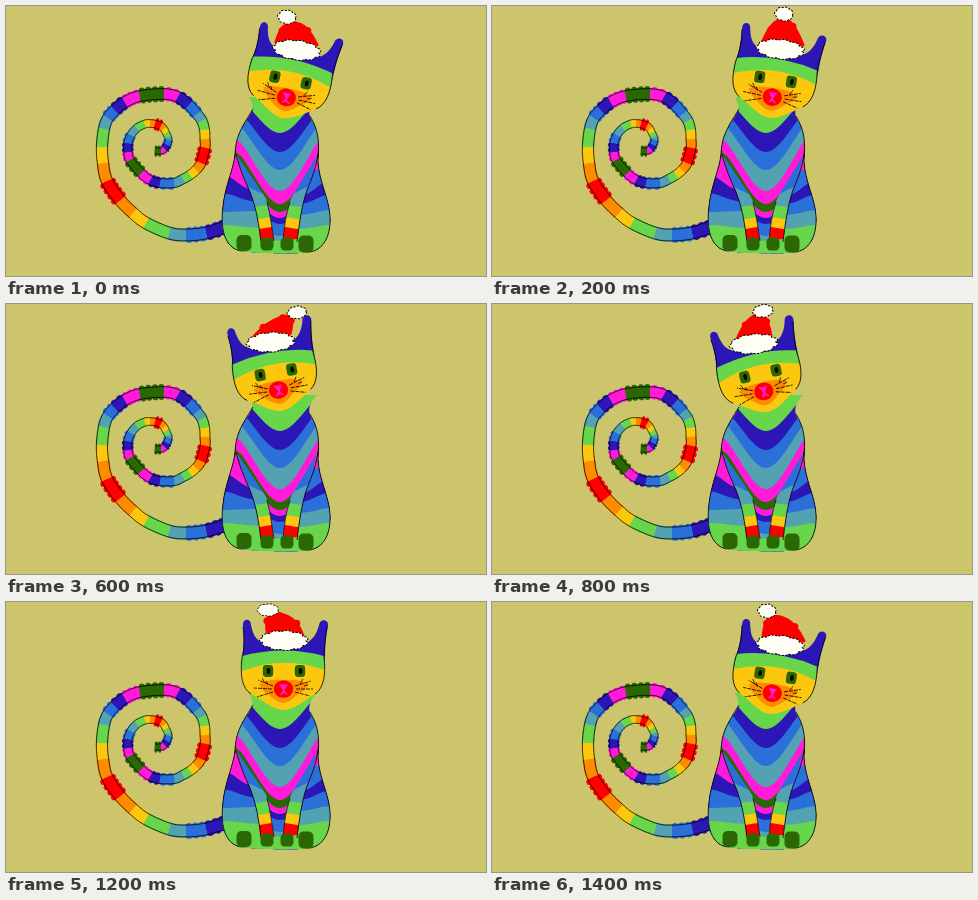
Animation, 480 px wide and 270 px high, one loop 1.6 s. Source, as an HTML page with a canvas:

```html
<!DOCTYPE html>
<html lang="en">
<head>
<meta charset="utf-8">
<title>Striped cat</title>
<style>
html, body { margin: 0; width: 100%; height: 100%; overflow: hidden; background: #cdc56b; }
canvas { display: block; width: 480px; height: 270px; }
</style>
</head>
<body>
<canvas id="stage" width="480" height="270"></canvas>
<script>
const ctx = document.getElementById('stage').getContext('2d');
const STEP = 200;
const INK = '#000';
const COL = {
  i: '#2c17b6', b: '#2b6fd9', t: '#53a2b2', g: '#68d64b', y: '#fcc80f',
  o: '#ff8c00', r: '#ff0000', m: '#ff1bd8', d: '#2b6804', w: '#fffef4'
};

// Head turn and shift, pompom (x, y, rx, ry), outline of the cap
const POSES = [
  { turn: 12, dx: -5.5, dy: 3.5, pom: [281, 11, 9, 6.8], cap: [270, 36, 274, 22, 286, 15, 303, 22, 311, 39] },
  { turn: 9, dx: -3.5, dy: 3.5, pom: [292, 8, 9, 6.8], cap: [270, 37, 277, 21, 289, 12, 302, 17, 311, 39] },
  { turn: 0, dx: 0, dy: 0, pom: [298, 8, 9, 6.2], cap: [259, 32, 273, 20, 291, 11, 299, 18, 297, 32] },
  { turn: -10, dx: 2, dy: -1.5, pom: [291, 8.5, 9.5, 6.2], cap: [246, 35, 256, 22, 279, 11, 288, 14, 284, 30] },
  { turn: -12.5, dx: 3, dy: -0.5, pom: [271, 7, 10, 6.2], cap: [245, 35, 252, 19, 266, 9, 276, 15, 279, 32] },
  { turn: -10, dx: 2, dy: -1.5, pom: [252, 6, 11, 5.8], cap: [247, 34, 249, 13, 262, 11, 274, 17, 277, 32] },
  { turn: 0, dx: 0, dy: 0, pom: [262, 8, 10.5, 6], cap: [262, 34, 258, 16, 272, 10, 292, 19, 297, 34] },
  { turn: 9, dx: -3.5, dy: 3.5, pom: [275, 9, 9, 6.8], cap: [271, 37, 272, 18, 286, 13, 304, 22, 312, 39] }
];

// Joints between the tail stripes, from the body to the tip
const TAIL = [
  219, 221, 200, 227, 180, 229, 163, 227, 140, 217, 127, 207, 114, 194, 101, 175,
  97, 157, 96, 141, 98, 123, 102, 112, 109, 104, 119, 96, 134, 90, 158, 88,
  172, 91, 183, 99, 191, 108, 196, 115, 198.5, 124, 199, 133, 199, 142, 195, 157,
  190, 164, 184, 169, 177, 173, 168, 177, 154, 177, 144, 174, 135, 167, 124, 154,
  122, 146, 122, 137, 125, 129, 131, 122, 139, 118, 144, 117.5, 149, 118, 155, 120,
  158, 123, 160, 127, 162, 131, 162.5, 134, 161, 139, 158.5, 143, 155, 145, 149, 145
];
const ORDER = 'ibtgyoroygtbimdm';
const SEGS = TAIL.length / 2 - 1;

function fill(shape, color) {
  ctx.fillStyle = color;
  ctx.fill(new Path2D(shape));
}

function line(shape, width = 0.8, color = INK, dash = []) {
  ctx.setLineDash(dash);
  ctx.lineWidth = width;
  ctx.strokeStyle = color;
  ctx.stroke(new Path2D(shape));
  ctx.setLineDash([]);
}

function oval(x, y, rx, ry, color, tilt = 0) {
  ctx.beginPath();
  ctx.ellipse(x, y, rx, ry, tilt, 0, Math.PI * 2);
  ctx.fillStyle = color;
  ctx.fill();
}

function clipped(shape, draw) {
  ctx.save();
  ctx.clip(new Path2D(shape));
  draw();
  ctx.restore();
}

// Catmull-Rom position on the tail, u counted in stripes
function tailAt(u) {
  const k = Math.min(SEGS - 1, Math.floor(u)), t = u - k;
  const p = (n, axis) => TAIL[2 * Math.max(0, Math.min(SEGS, n)) + axis];
  return [0, 1].map(axis => {
    const a = p(k - 1, axis), b = p(k, axis), c = p(k + 1, axis), d = p(k + 2, axis);
    return b + 0.5 * t * (c - a + t * (2 * a - 5 * b + 4 * c - d + t * (3 * (b - c) + d - a)));
  });
}

const tailWidth = u => 13.5 - 6.5 * Math.pow(u / SEGS, 1.3);

function tailSide(u, offset) {
  const [x, y] = tailAt(u);
  const [x1, y1] = tailAt(Math.max(0, u - 0.1));
  const [x2, y2] = tailAt(Math.min(SEGS, u + 0.1));
  const len = Math.hypot(x2 - x1, y2 - y1) || 1;
  return [x - (y2 - y1) / len * offset, y + (x2 - x1) / len * offset];
}

function trace(from, to, offset) {
  ctx.beginPath();
  for (let u = from; u <= to + 0.001; u += 0.125) ctx.lineTo(...tailSide(u, offset(u)));
}

function drawTail() {
  for (let k = 0; k < SEGS; k++) {
    const key = ORDER[k % 16], w = tailWidth(k);
    ctx.strokeStyle = COL[key];
    ctx.lineWidth = w;
    ctx.lineCap = 'butt';
    trace(k, k + 1, () => 0);
    ctx.stroke();
    if (!'dmirb'.includes(key)) continue;
    // Rounded cross strokes give the scalloped edge
    const [x1, y1] = tailAt(k), [x2, y2] = tailAt(k + 1);
    const len = Math.hypot(x2 - x1, y2 - y1);
    const n = Math.max(2, Math.round(len / 6));
    ctx.lineCap = 'round';
    ctx.lineWidth = len / n;
    const reach = w / 2 + 1.2 - len / n / 2 + (key === 'd' || key === 'r' ? 0.8 : 0);
    for (let j = 0; j < n; j++) {
      const u = k + (j + 0.5) / n;
      ctx.beginPath();
      ctx.moveTo(...tailSide(u, -reach));
      ctx.lineTo(...tailSide(u, reach));
      ctx.stroke();
    }
  }
  ctx.lineCap = 'butt';
  ctx.strokeStyle = INK;
  ctx.lineWidth = 0.8;
  for (const side of [-0.44, 0.44]) {
    trace(0, SEGS, u => tailWidth(u) * side);
    ctx.stroke();
  }
}

const BODY = 'M243 91C247 98 248 104 242 112C233 125 230 132 229 148C228 162 219 180 217 200' +
  'C214 224 219 242 235 245C258 248 292 248 304 246C320 243 325 226 324 210C323 192 313 176 312 155' +
  'C314 132 311 122 305 113C301 106 304 98 311 91Z';
const SIDE_L = 'M228 135C231 155 238 172 244 186C251 204 253 220 256 250H205V135Z';
const SIDE_R = 'M313 135C311 155 306 170 301 184C295 202 293 220 290 250H335V135Z';
const LEG_L = 'M228 145C240 163 251 178 260 193C264 206 266 222 268 236H254C253 218 250 202 243 185Z';
const LEG_R = 'M314 145C304 162 293 178 285 193C280 206 278 222 277 236H291C293 218 296 202 302 184Z';

// Everything below a rounded V
function chevron(edge, tip, key) {
  fill(`M205 ${edge - 22}L235 ${edge}C250 ${edge + (tip - edge) * 0.42} 262 ${tip} 274 ${tip}` +
    `S298 ${edge + (tip - edge) * 0.42} 311 ${edge}L340 ${edge - 22}V260H205Z`, COL[key]);
}

// Everything below a slanted wavy edge
function slope(x, y, x2, y2, key) {
  const mid = (x + x2) / 2;
  fill(`M${x} ${y}C${mid} ${y} ${mid} ${y2} ${x2} ${y2}V260H${x}Z`, COL[key]);
}

function drawBody() {
  clipped(BODY, () => {
    fill('M200 80H340V260H200Z', COL.g);
    chevron(93, 127, 'i');
    chevron(107, 146, 'b');
    chevron(121, 164, 't');
    chevron(137, 185, 'm');
    chevron(150, 198, 'd');
    chevron(164, 206, 'm');
    chevron(176, 212, 'i');
    chevron(186, 218, 'b');
    chevron(200, 230, 't');
    clipped(LEG_L, () => {
      slope(225, 140, 272, 150, 'b');
      slope(225, 178, 272, 190, 't');
      slope(240, 201, 272, 199, 'g');
      slope(240, 214, 272, 211, 'y');
      slope(240, 224, 272, 221, 'r');
    });
    clipped(LEG_R, () => {
      slope(272, 150, 318, 140, 'b');
      slope(272, 190, 318, 178, 't');
      slope(272, 199, 304, 201, 'g');
      slope(272, 211, 304, 214, 'y');
      slope(272, 221, 304, 224, 'r');
    });
    clipped(SIDE_L, () => {
      slope(210, 132, 255, 148, 'm');
      slope(210, 168, 252, 184, 'i');
      slope(210, 187, 256, 196, 'b');
      slope(210, 206, 258, 205, 't');
      slope(210, 219, 260, 222, 'g');
    });
    clipped(SIDE_R, () => {
      slope(290, 148, 330, 138, 'm');
      slope(290, 168, 330, 160, 'b');
      slope(290, 190, 330, 174, 'i');
      slope(290, 198, 330, 188, 'b');
      slope(290, 209, 330, 204, 't');
      slope(290, 223, 330, 219, 'g');
    });
    fill('M205 236Q240 228 254 233Q272 236 291 233Q310 228 340 236V260H205Z', COL.g);
    // Dark slivers beside the shoulders
    fill('M228 136L231 148L226 158Z', COL.d);
    fill('M313 136L311 150L315 160Z', COL.d);
  });
  line('M247 103C233 125 230 132 229 148C228 162 219 180 217 200C214 224 219 242 235 245');
  line('M304 246C320 243 325 226 324 210C323 192 313 176 312 155C314 132 311 122 304 110');
  line('M230 148C234 164 239 175 244 186C251 204 253 220 255 236');
  line('M312 148C310 162 306 172 301 184C295 202 293 220 291 236');
  line('M261 196C264 208 266 222 268 235M284 196C280 208 278 222 277 235', 0.7);
  [[238, 237, 7.5, 8], [261, 238, 6.5, 6.5], [281, 238, 6.5, 6.5], [300, 238, 7.5, 8.5]]
    .forEach(([x, y, rx, ry]) => blob(x, y, rx, ry, COL.d));
}

// Rounded square, like a scribbled pad
function blob(x, y, rx, ry, color) {
  ctx.beginPath();
  ctx.roundRect(x - rx, y - ry, rx * 2, ry * 2, Math.min(rx, ry) * 0.65);
  ctx.fillStyle = color;
  ctx.fill();
}

function cloud(x, y, rx, ry, lobes, tilt = 0) {
  ctx.save();
  ctx.translate(x, y);
  ctx.rotate(tilt);
  ctx.beginPath();
  for (let a = 0; a < Math.PI * 2; a += 0.06) {
    const s = 0.93 + 0.12 * Math.abs(Math.sin(a * lobes / 2));
    ctx.lineTo(Math.cos(a) * rx * s, Math.sin(a) * ry * s);
  }
  ctx.closePath();
  ctx.fillStyle = COL.w;
  ctx.fill();
  ctx.setLineDash([2.2, 1.4]);
  ctx.lineWidth = 1;
  ctx.strokeStyle = INK;
  ctx.stroke();
  ctx.restore();
}

const FACE = 'M236 56C234 74 236 86 245 92C257 98 267 108 277 108C287 108 298 99 309 92C318 86 320 72 318 56Z';
const CROWN = 'M237 24C236 16 245 16 245 23C247 33 250 38 257 41Q278 37 300 41C307 38 311 31 313 23' +
  'C314 16 323 17 322 24C319 36 319 48 319 60Q278 46 235 62C238 48 238 36 237 24Z';

function drawHead() {
  fill(FACE, COL.y);
  fill('M253 82Q262 77 277 78Q294 77 303 82Q299 89 291 93Q283 101 277 101Q270 100 263 93Q256 89 253 82Z', COL.o);
  fill(CROWN, COL.i);
  fill('M236 54Q278 43 318 54Q320 62 318 68Q278 53 236 69Q233 61 236 54Z', COL.g);
  line('M237 25C239 40 238 48 236 56C234 74 236 86 245 92M321 25C319 40 318 48 318 56C320 72 318 86 309 92');
  for (const x of [262, 294]) {
    blob(x, 69, 5.2, 6, COL.d);
    oval(x + 0.5, 69, 1.8, 3, INK);
  }
  line('M267 84L252 78M266 87L248 86M267 90L251 95M289 84L305 79M290 87L307 87M289 90L304 94', 0.8, INK, [4, 1]);
  line('M256 76L259 81M260 79L262 83M294 82L297 77M298 84L302 83', 0.7);
  oval(277.5, 87, 9.7, 8.8, COL.r);
  fill('M273 82Q278 83 282 82L279 87L278.5 89L282 93L278 91L274 93L277 88Z', COL.m);
  line('M278 87V90M278 90L274.5 92.5M278 90L281.5 92.5', 1.3, COL.m);
}

function drawCap(p) {
  const c = p.cap;
  ctx.beginPath();
  ctx.moveTo(c[0], c[1]);
  for (let n = 2; n < 8; n += 2) {
    const end = n === 6 ? [c[8], c[9]] : [(c[n] + c[n + 2]) / 2, (c[n + 1] + c[n + 3]) / 2];
    ctx.quadraticCurveTo(c[n], c[n + 1], ...end);
  }
  ctx.closePath();
  ctx.lineJoin = 'round';
  ctx.fillStyle = ctx.strokeStyle = COL.r;
  ctx.lineWidth = 3;
  ctx.stroke();
  ctx.fill();
  // Scalloped rim along the top
  for (let n = 2; n < 8; n += 2) {
    oval(c[n] * 0.85 + c[8] * 0.08 + c[0] * 0.07, c[n + 1] * 0.85 + c[9] * 0.15, 4, 3.5, COL.r);
  }
}

function draw(p) {
  ctx.fillStyle = '#cdc56b';
  ctx.fillRect(0, 0, 480, 270);
  drawTail();
  drawBody();
  const turn = p.turn * Math.PI / 180;
  const inHead = part => {
    ctx.save();
    ctx.translate(277 + p.dx, 127 + p.dy);
    ctx.rotate(turn);
    ctx.translate(-277, -127);
    part();
    ctx.restore();
  };
  inHead(drawHead);
  drawCap(p);
  inHead(() => cloud(278, 38.5, 23.5, 9.6, 11, 0.02 - turn * 0.5));
  const [x, y, rx, ry] = p.pom;
  cloud(x, y, rx, ry, 7, turn * 0.6);
}

const start = performance.now();
let shown = -1;
function tick() {
  const now = Math.floor((performance.now() - start) / STEP) % POSES.length;
  if (now !== shown) draw(POSES[shown = now]);
  requestAnimationFrame(tick);
}
tick();
</script>
</body>
</html>
```
